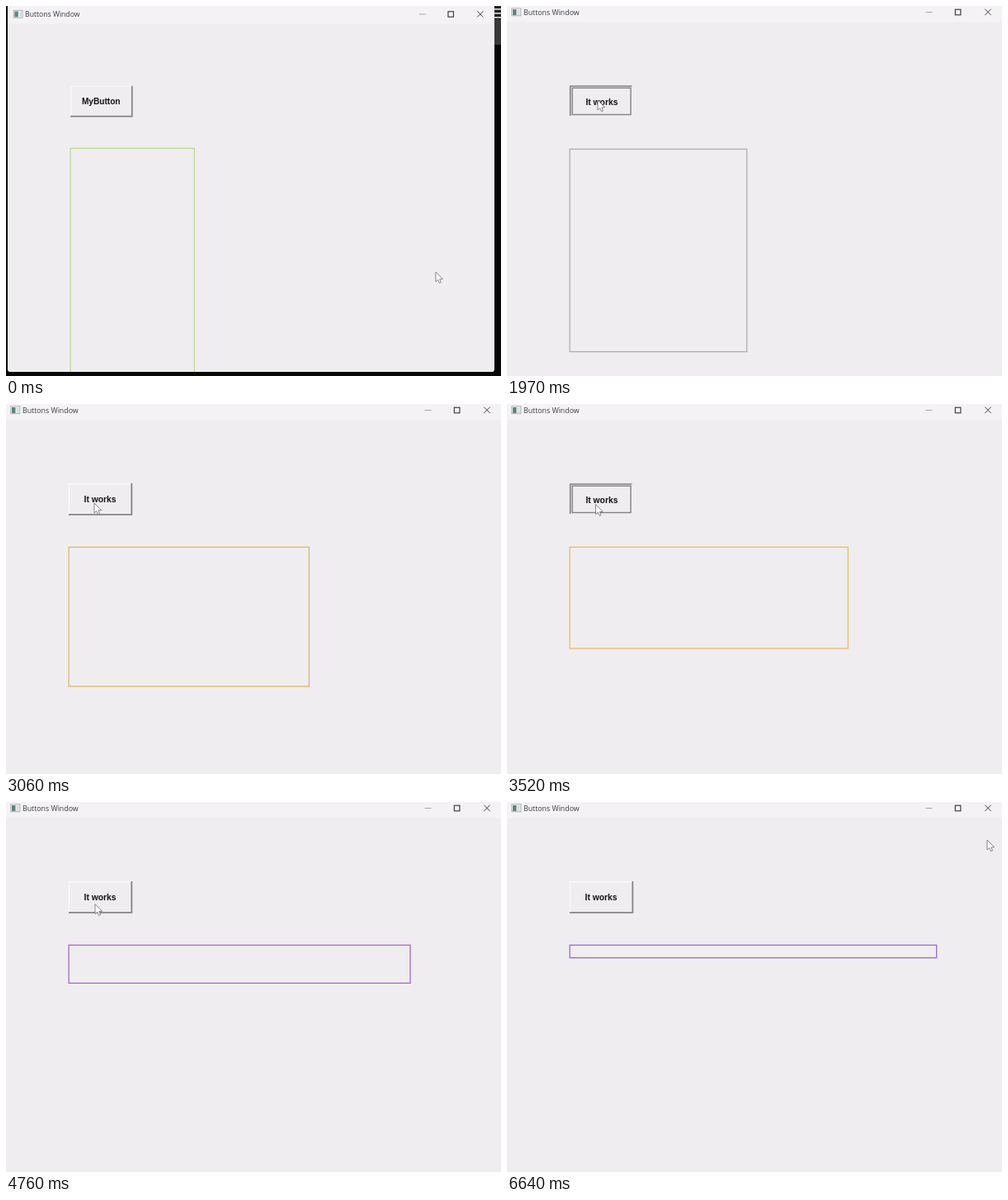
Write an HTML page with a canvas that moves like this. It is 600 px wide and 448 px high and loops after 6.67 s.

```html
<!DOCTYPE html>
<html lang="en">
<head>
<meta charset="utf-8">
<title>Buttons Window</title>
<style>
  html, body { margin: 0; width: 100%; height: 100%; overflow: hidden; background: #080808; }
  canvas { display: block; }
</style>
</head>
<body>
<canvas id="stage" width="600" height="448"></canvas>
<script>
const ctx = document.getElementById('stage').getContext('2d');
const LOOP = 6670;
const UNIT = 15.33;   // every click widens the box and lowers its height by this much
const HOLD = 0.8;     // share of a click during which the button is down

// Runs of evenly spaced clicks: first press, last release, number of clicks.
const bursts = [
  [940, 1390, 2], [1580, 2240, 4], [2270, 2550, 1], [2640, 3000, 2],
  [3090, 3210, 2], [3270, 3880, 3], [4030, 4670, 3], [4790, 5030, 2]
];
const clicks = bursts.flatMap(([start, end, n]) => {
  const step = (end - start) / (n - 1 + HOLD);
  return Array.from({ length: n }, (_, i) => {
    const down = start + i * step;
    return { down, up: down + HOLD * step };
  });
});

const palette = ['#b6d98a', '#a5acac', '#dcb45c', '#e9b85c', '#a45cc0', '#8d62d2'];

// Cursor key points: time, x, y
const path = [
  [30, 528, 326], [700, 135, 117], [760, 112, 114], [1970, 110, 114],
  [3060, 107, 120], [4030, 108, 123.5], [6090, 108, 124], [6640, 582, 46]
];

const clamp = v => Math.max(0, Math.min(1, v));
const ease = v => v * v * (3 - 2 * v);
const lerp = (a, b, v) => a + (b - a) * v;

function rect(x, y, w, h, color) {
  ctx.fillStyle = color;
  ctx.fillRect(x, y, w, h);
}

function frame(x, y, w, h, color, width) {
  ctx.strokeStyle = color;
  ctx.lineWidth = width;
  ctx.strokeRect(x, y, w, h);
}

function line(color, width, ...points) {
  ctx.strokeStyle = color;
  ctx.lineWidth = width;
  ctx.beginPath();
  points.forEach(([x, y]) => ctx.lineTo(x, y));
  ctx.stroke();
}

function text(str, x, y, font, color, align) {
  ctx.font = font;
  ctx.fillStyle = color;
  ctx.textAlign = align;
  ctx.fillText(str, x, y);
}

function drawDesktop() {
  rect(0, 0, 600, 448, '#080808');
  rect(585, 0, 15, 47, '#383838');
  rect(585, 0, 15, 16, '#202020');
  for (let y = 3; y < 16; y += 5) rect(590, y, 10, 1.6, '#dedede');
}

// Everything drawn afterwards stays inside the window.
function drawWindow() {
  ctx.beginPath();
  ctx.roundRect(-1.5, -12, 602, 461.5, 3.5);
  ctx.clip();
  rect(-2, -12, 604, 462, '#efedf0');
  rect(-2, -12, 604, 31.5, '#f4f2f5');

  rect(5.5, 2.5, 11.5, 9.5, '#fafafa');
  frame(5.8, 2.8, 11, 9, '#a2a6a8', 0.9);
  rect(7, 4, 4.5, 7, '#5c857e');
  rect(12.5, 4, 3, 7, '#d9dddd');
  text('Buttons Window', 20, 10.6, '8.8px "Open Sans", "Noto Sans", sans-serif', '#3c3c3e', 'left');

  line('#a5a4a6', 1, [507.5, 7.5], [515.5, 7.5]);
  frame(543.3, 4.2, 6.6, 6.6, '#303030', 1.1);
  line('#404040', 1, [579.3, 3.7], [586.7, 11.1]);
  line('#404040', 1, [586.7, 3.7], [579.3, 11.1]);
}

function drawButton(label, pressed) {
  if (pressed) {
    line('#858487', 1.7, [76.7, 133], [76.7, 97], [151.5, 97]);
    frame(79.2, 99.2, 70.8, 32.3, '#838286', 1.4);
  } else {
    line('#fbfafc', 1.2, [76.6, 134], [76.6, 96.6], [153, 96.6]);
    line('#858488', 1.8, [76, 133.8], [152.3, 133.8], [152.3, 96]);
  }
  const shift = pressed ? 0.9 : 0;
  text(label, 114 + shift, 118.6 + shift,
    'bold 10.3px "Liberation Sans", Arial, sans-serif', '#111', 'center');
}

function drawBox(count) {
  const cols = 10 + count;
  frame(76.1, 173.3, cols * UNIT, (30 - cols) * UNIT, palette[Math.floor(count / 3.7)], 1.2);
}

function drawCursor(t) {
  const next = path.findIndex(([time]) => time >= t);
  const b = path.at(next);
  const a = path[Math.max(0, next < 0 ? path.length - 1 : next - 1)];
  const v = a === b ? 0 : ease((t - a[0]) / (b[0] - a[0]));
  ctx.save();
  ctx.translate(lerp(a[1], b[1], v), lerp(a[2], b[2], v));
  ctx.fillStyle = '#fff';
  ctx.strokeStyle = '#77767a';
  ctx.lineWidth = 0.9;
  const arrow = new Path2D('M0 0V12L2.7 9.6 4.6 13.7 6.5 12.8 4.8 8.9 8.6 8.7Z');
  ctx.fill(arrow);
  ctx.stroke(arrow);
  ctx.restore();
}

function draw(t) {
  const count = clicks.filter(c => c.up <= t).length;
  const pressed = clicks.some(c => t >= c.down && t < c.up);
  const zoom = ease(clamp((t - 30) / 640));
  const scale = lerp(0.98, 1, zoom);

  drawDesktop();
  ctx.save();
  ctx.translate(lerp(3.5, 0, zoom), lerp(2.6, 0, zoom));
  ctx.scale(scale, scale);
  drawWindow();
  drawButton(count ? 'It works' : 'MyButton', pressed);
  drawBox(count);
  drawCursor(t);
  ctx.restore();
}

function tick() {
  draw(performance.now() % LOOP);
  requestAnimationFrame(tick);
}
tick();
</script>
</body>
</html>
```
